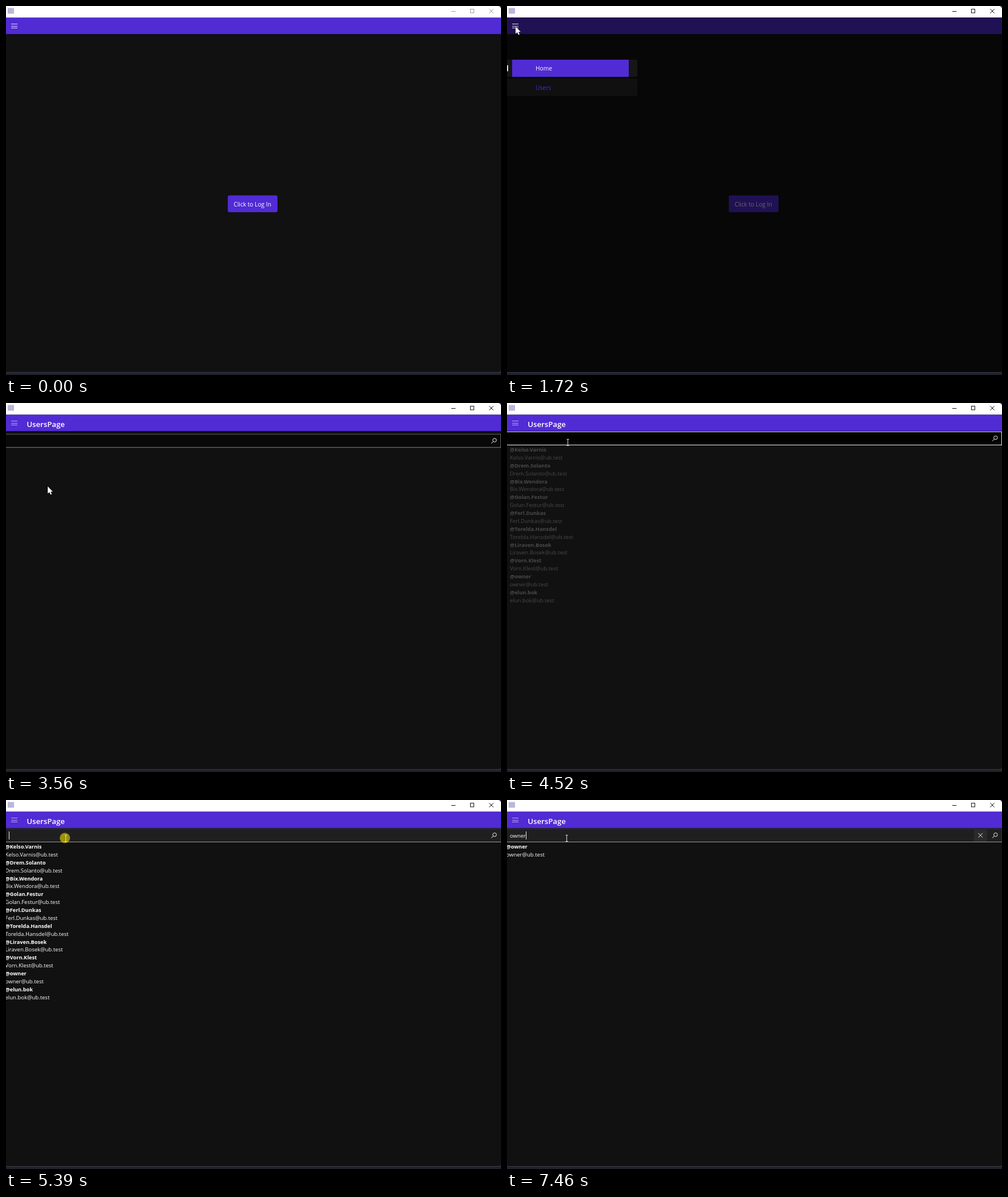
Write an HTML page with a canvas that moves like this. It is 866 by 646 pixels and loops after 8000 ms.

```html
<!DOCTYPE html>
<html lang="en">
<head>
<meta charset="utf-8">
<title>Users app</title>
<style>
  html, body { margin: 0; width: 100%; height: 100%; overflow: hidden; background: #111; }
  canvas { display: block; }
</style>
</head>
<body>
<canvas id="stage" width="866" height="646"></canvas>
<script>
const ctx = document.getElementById('stage').getContext('2d');
const LOOP = 8000, PURPLE = '#512bd4', DARK = '#111';
const FONT = '"Open Sans", sans-serif';
const users = ['Kelso.Varnis', 'Drem.Solanto', 'Bix.Wendora', 'Golan.Festur', 'Ferl.Dunkas',
  'Torelda.Hansdel', 'Liraven.Bosek', 'Vorn.Klest', 'owner', 'elun.bok'];
const QUERY = 'owner', keyTimes = [6190, 6320, 6660, 6760, 6860];

// Pointer path: time, x, y
const path = [
  [120, 685, 533], [880, 86, 97], [1300, 15, 36], [1780, 15, 36], [1860, 60, 132],
  [2060, 131, 188], [2270, 55, 152], [2410, 66, 142], [2600, 66, 142], [2610, 67, 142],
  [3280, 67, 142], [3500, 73, 146], [4100, 73, 146], [4520, 106, 69], [4800, 104, 67], [LOOP, 104, 67]
];
// Click highlights: start, end, x, y
const clicks = [[1380, 1510, 15, 36], [2750, 2880, 67, 143], [5390, 5530, 103, 66.5]];

const progress = (t, start, end) => Math.min(1, Math.max(0, (t - start) / (end - start)));
const easeOut = (p, power = 3) => 1 - (1 - p) ** power;

function rect(x, y, w, h, color, radius = 0) {
  ctx.fillStyle = color;
  ctx.beginPath();
  ctx.roundRect(x, y, w, h, radius);
  ctx.fill();
}

function lines(color, width, ...segments) {
  ctx.strokeStyle = color;
  ctx.lineWidth = width;
  ctx.beginPath();
  for (const [x1, y1, x2, y2] of segments) {
    ctx.moveTo(x1, y1);
    ctx.lineTo(x2, y2);
  }
  ctx.stroke();
}

function text(str, x, y, size, color = '#fff', weight = 400) {
  ctx.font = `${weight} ${size}px ${FONT}`;
  ctx.fillStyle = color;
  ctx.fillText(str, x, y);
}

function cross(x, y, r, color) {
  lines(color, 1, [x - r, y - r, x + r, y + r], [x - r, y + r, x + r, y - r]);
}

function pointerAt(t) {
  const i = path.findIndex(key => key[0] > t);
  const [t0, x0, y0] = path[i - 1], [t1, x1, y1] = path[i];
  const p = progress(t, t0, t1);
  return [x0 + (x1 - x0) * p, y0 + (y1 - y0) * p];
}

function drawTitleBar(active) {
  const color = active ? '#111' : '#9c9ca8';
  rect(0, 0, 866, 20.5, '#fff', [0, 5, 0, 0]);
  rect(3, 3.5, 11, 10, '#b9b8da');
  lines(color, 1, [779, 9.5, 786.5, 9.5]);
  ctx.strokeRect(812.5, 5.5, 6, 6.5);
  cross(849, 9, 3.7, color);
}

function drawDrawer(open, pressed) {
  rect(0, 20, 866, 621, `rgba(0,0,0,${0.6 * open})`);
  ctx.save();
  ctx.translate(-228 * (1 - open), 0);
  rect(-4, 94, 232, 30, '#161616', 3);
  rect(9, 94, 204, 30, PURPLE);
  rect(0, 103.5, 2, 11, '#ddd', 1);
  text('Home', 50, 113, 10.2);
  rect(-4, 127, 232, 30.5, '#101010', 3);
  text('Users', 50, 146.6, 10.2, pressed ? '#38209a' : PURPLE);
  ctx.restore();
}

function drawSearchBar(t) {
  const focused = t >= 5390, hover = t >= 4480 && !focused;
  const border = focused ? '#333' : hover ? '#e8e8e8' : '#666';
  rect(0, 50, 866, 24, focused ? '#1f1f1f' : hover ? '#020202' : '#090909');
  lines(border, 1, [0, 50.5, 866, 50.5], [865.5, 50, 865.5, 74]);
  lines(focused ? '#999' : hover ? '#eee' : '#858585', 1, [0, 73.5, 866, 73.5]);
  ctx.strokeStyle = '#eee';
  ctx.beginPath();
  ctx.arc(854.8, 60.8, 3.2, 0, 7);
  ctx.moveTo(852.5, 63.2);
  ctx.lineTo(849, 66.5);
  ctx.stroke();
  if (!focused) return;

  const typed = QUERY.slice(0, keyTimes.filter(time => time <= t).length);
  text(typed, 5, 65.6, 9.5);
  const caret = Math.round(5 + ctx.measureText(typed).width) + 0.5;
  lines('#eee', 1, [caret, 55, caret, 69]);
  if (typed) {
    rect(817, 52, 23, 21, '#2b2b2b');
    cross(828.3, 61.8, 3.8, '#eee');
  }
}

function drawUsers(t) {
  if (t >= 7060 && t < 7460) return;
  const p = progress(t, 4450, 4750);
  const x = -1.5 + 11 * (1 - p) ** 2;
  const shown = t < 7060 ? users : users.filter(name => name.includes(QUERY));
  ctx.globalAlpha = p;
  shown.forEach((name, i) => {
    const y = 85 + i * 27.75;
    text('@' + name, x, y, 9.2, '#fff', 700);
    text(name + '@ub.test', x, y + 13.9, 9.5);
  });
  ctx.globalAlpha = 1;
}

function drawPointer(t) {
  if (t < 120 || (t >= 1860 && t < 2060)) return;
  const [x, y] = pointerAt(t);
  ctx.save();
  ctx.translate(x, y);
  if (t > 4100 && y < 75) {
    lines('#ddd', 1, [0.5, -5, 0.5, 5], [-1.5, -5.5, 2.5, -5.5], [-1.5, 5.5, 2.5, 5.5]);
  } else {
    const arrow = new Path2D('M0 0V12.5L3 10L5 14.5L7 13.5L5.2 9.2H9Z');
    ctx.strokeStyle = '#000';
    ctx.lineWidth = 0.8;
    ctx.stroke(arrow);
    ctx.fillStyle = '#fff';
    ctx.fill(arrow);
  }
  ctx.restore();
}

function draw(t) {
  const onUsers = t >= 3420;
  rect(0, 0, 866, 646, '#20212a');
  lines('#3a3d48', 1, [0, 641.5, 866, 641.5]);
  rect(0, 20, 866, 621, DARK, [0, 0, 5, 0]);
  drawTitleBar(t >= 1380);

  if (onUsers) {
    const p = progress(t, 3420, 3770);
    ctx.save();
    ctx.translate(0, 20 * (1 - easeOut(p)));
    ctx.globalAlpha = Math.min(1, p * 3);
    drawSearchBar(t);
    ctx.restore();
    drawUsers(t);
  } else {
    rect(388, 331.5, 87, 29.5, PURPLE, 3);
    text('Click to Log In', 398.3, 350.6, 10.2);
  }

  rect(0, 20.5, 866, 29, PURPLE);
  lines('#090909', 1, [0, 50, 866, 50]);
  if (onUsers) {
    if (t > 3770) lines(t >= 4480 && t < 5390 ? '#e8e8e8' : '#333', 1, [0, 50.5, 866, 50.5]);
    text('UsersPage', 36.3, 41.6, 13.2, '#fff', 600);
  }

  const open = easeOut(progress(t, 1500, 1720)) * (1 - progress(t, 3270, 3450));
  if (open > 0) drawDrawer(open, t >= 2750);

  lines(onUsers ? '#b9abed' : '#e4def8', 1,
    ...[31.5, 35.5, 38.5].map(y => [9, y, 20, y]));

  drawPointer(t);
  for (const [start, end, x, y] of clicks) {
    if (t >= start && t < end) rect(x - 9, y - 9, 18, 18, 'rgba(255,235,0,.55)', 9);
  }
}

function tick() {
  draw(performance.now() % LOOP);
  requestAnimationFrame(tick);
}
tick();
</script>
</body>
</html>
```
